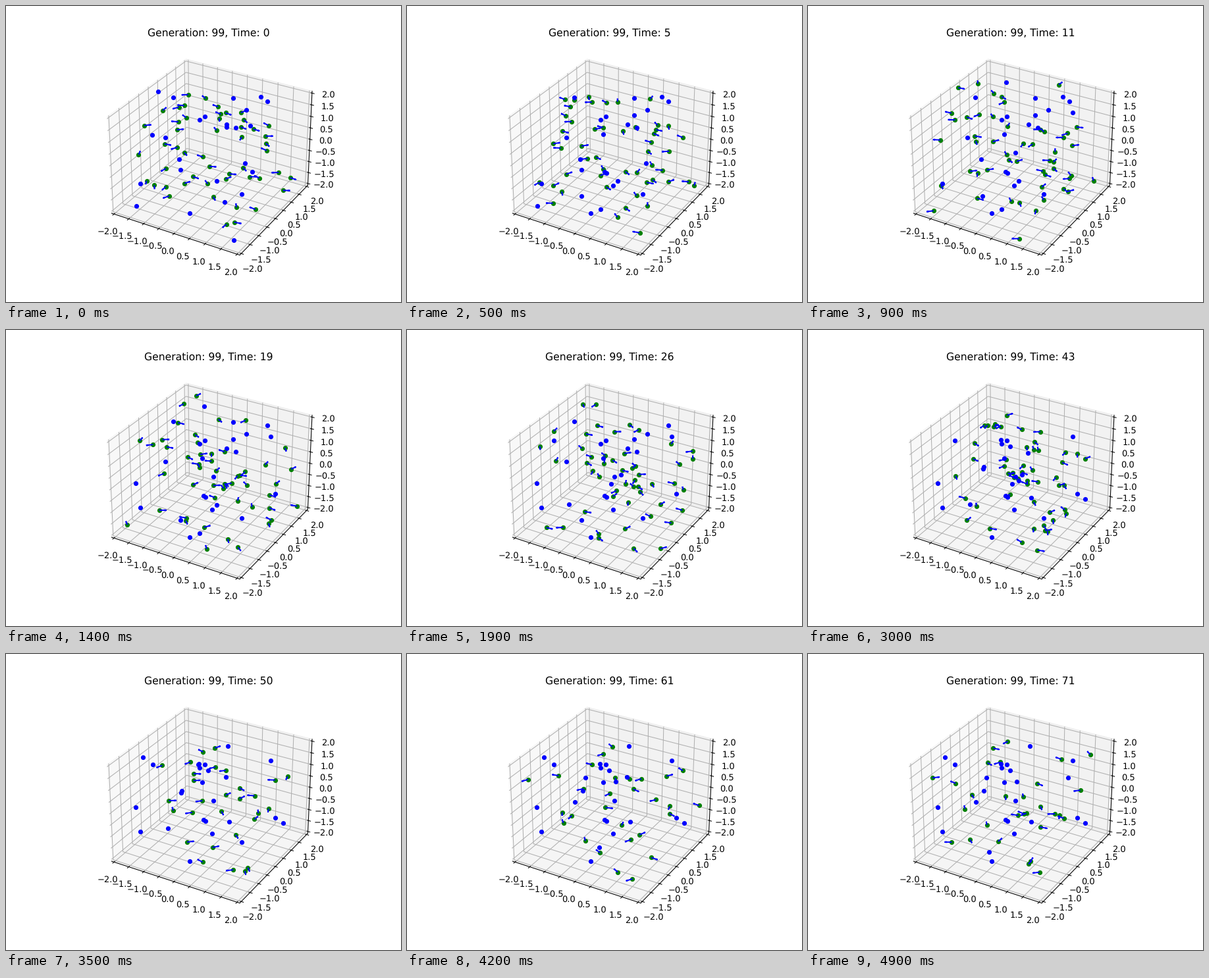
A matplotlib script that plays this animation: 600x450 px, repeating every 5 s.

```python
import math

import matplotlib.pyplot as plt
import numpy as np
from matplotlib.animation import FuncAnimation

FRAMES, INTERVAL = 50, 100
LAST_STEP, STARVE_STEP = 71, 50
AGENTS, SURVIVORS, FOODS = 50, 29, 25
SPEED, ARROW, REACH = 0.1, 0.2, 0.36
LIMIT = 2.0

rng = np.random.default_rng(99)


def random_places(count):
    return rng.uniform(-LIMIT, LIMIT, (count, 3))


def wander():
    """Positions and level headings of all agents, indexed by time step."""
    steps = np.arange(LAST_STEP + 1)[:, None]
    turns = rng.normal(0, 0.25, (LAST_STEP + 1, AGENTS))
    heading = rng.uniform(0, 2 * np.pi, AGENTS) + turns.cumsum(axis=0)
    climb = 0.6 * np.sin(rng.uniform(0, 2 * np.pi, AGENTS) + 0.1 * steps)
    velocity = np.stack([np.cos(heading), np.sin(heading), climb], axis=-1)
    travel = SPEED * velocity.cumsum(axis=0)
    # Bounce off the walls by folding the unbounded path.
    path = (random_places(AGENTS) + travel + LIMIT) % (4 * LIMIT)
    back = path > 2 * LIMIT
    position = np.where(back, 4 * LIMIT - path, path) - LIMIT
    facing = np.where(back, -velocity, velocity)
    facing[..., 2] = 0
    return position, facing


def forage(position):
    """Food places and living agents per step; eaten food reappears elsewhere."""
    food = random_places(FOODS)
    alive = np.arange(AGENTS)
    meals = np.zeros(AGENTS, int)
    history = []
    for step in range(LAST_STEP + 1):
        if step == STARVE_STEP:
            alive = np.argsort(-meals, kind="stable")[:SURVIVORS]
        if step:
            gaps = position[step, alive, None] - food
            near = np.linalg.norm(gaps, axis=-1) < REACH
            meals[alive] += near.sum(axis=1)
            eaten = near.any(axis=0)
            food[eaten] = random_places(eaten.sum())
        history.append((food.copy(), alive))
    return history


def time_step(frame):
    return max(frame, math.ceil(1.5 * frame - 2.5))


position, facing = wander()
history = forage(position)

# Unhinted glyphs keep the title and tick labels at their natural width.
plt.rcParams["text.hinting"] = "none"
fig = plt.figure(figsize=(6.4, 4.8), dpi=93.75)
ax = fig.add_subplot(projection="3d", computed_zorder=False)
edge = LIMIT + 1 / 12
ax.set(xlim=(-edge, edge), ylim=(-edge, edge), zlim=(-edge, edge))
drawn = []


def update(frame):
    while drawn:
        drawn.pop().remove()
    step = time_step(frame)
    food, alive = history[step]
    agents, arrows = position[step, alive], facing[step, alive]
    drawn.extend([
        ax.scatter(*agents.T, color="green", depthshade=False, zorder=4),
        ax.quiver(*agents.T, *arrows.T, length=ARROW, color="blue", zorder=5),
        ax.scatter(*food.T, color="blue", depthshade=False, zorder=6),
    ])
    ax.set_title(f"Generation: 99, Time: {step}")
    return drawn


anim = FuncAnimation(fig, update, frames=FRAMES, interval=INTERVAL,
                     init_func=lambda: [], repeat=True, repeat_delay=0)
plt.show()
```
